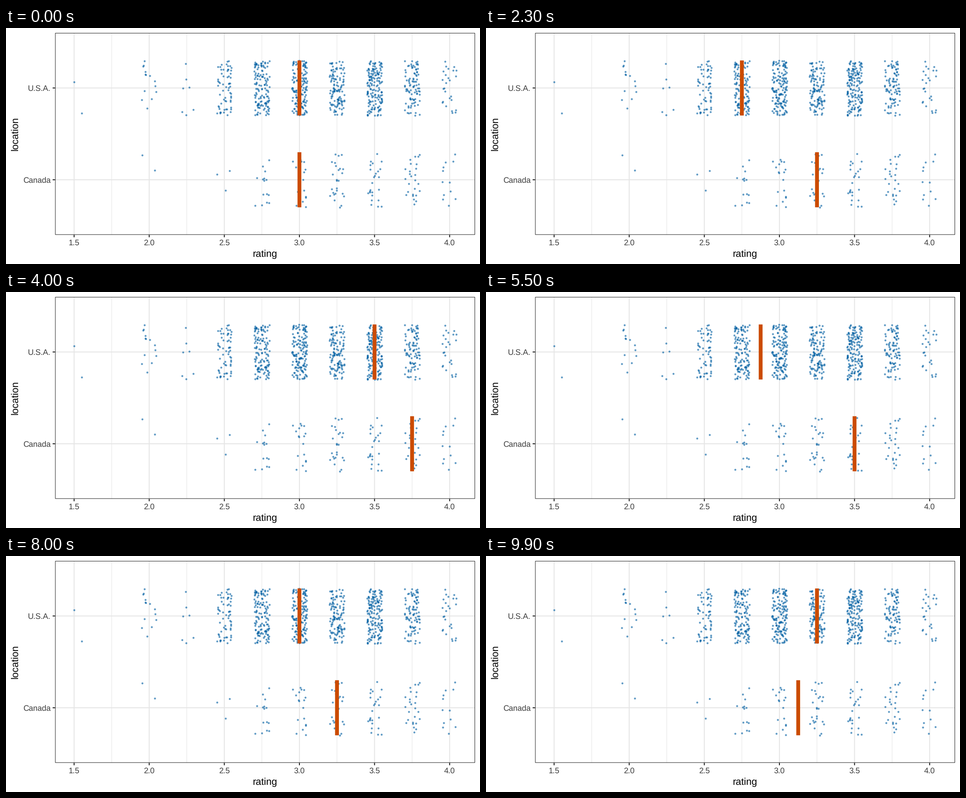
A matplotlib script that plays this animation: 1058x529 px, repeating every 10000 ms.

```python
import numpy as np
import matplotlib.pyplot as plt
from matplotlib.animation import FuncAnimation
from matplotlib.patches import Rectangle

plt.rcParams["font.family"] = "Liberation Sans"
plt.rcParams["text.hinting"] = "none"

W, H, DPI = 1058, 529, 100
PT = 72 / DPI  # points per pixel

LEFT, RIGHT, TOP, BOTTOM = 109.6, 1047, 11, 463.6
ROW = (BOTTOM - TOP) / 2.2
USA_Y, CANADA_Y = TOP + 0.6 * ROW, TOP + 1.6 * ROW
UNIT = 335.3
HALF_BAR = 0.3 * ROW
THIN, THICK = 1.07, 2.13

BLUE, ORANGE = "#005FA3", "#CB4B00"
GRID, DARK, LABEL = "#E6E6E6", "#262626", "#3C3C3C"

HOLD, STEP = 3, 4  # frames at rest, frames per draw

# Rating drawn for each location, one key pose per draw
USA_DRAWS = [3, 3, 3, 3.5, 2.75, 3, 2.5, 3.25, 3, 2.75, 3.5, 3.75, 2.75,
             3, 2.75, 3.5, 3.5, 3.5, 2.75, 3.25, 3, 3.5, 2.5, 3, 3.5]
CANADA_DRAWS = [3, 3.75, 3.25, 4, 3.25, 3.5, 3, 3.25, 3.75, 3.5, 3.75, 4, 3.75,
                3.25, 3.75, 2.75, 3, 3, 3.5, 4, 3.25, 4, 3.5, 3, 3.25]

# Number of points at each rating
USA_COUNTS = {2.0: 14, 2.25: 7, 2.5: 62, 2.75: 130, 3.0: 150,
              3.25: 120, 3.5: 161, 3.75: 92, 4.0: 26}
CANADA_COUNTS = {2.75: 15, 3.0: 18, 3.25: 26, 3.5: 25, 3.75: 26, 4.0: 12}
# Lone points, in pixels
LONERS = [(152, 121), (168.5, 191), (303.5, 285), (331.5, 319),
          (471, 327.5), (499, 320), (489.5, 364)]


def px(rating):
    return 152 + (rating - 1.5) * UNIT


def jitter(rng, counts, row_y):
    """Scatter points evenly around each rating on one row."""
    ratings = np.repeat(list(counts), list(counts.values()))
    x = px(ratings + rng.uniform(-0.05, 0.05, ratings.size))
    y = row_y + rng.uniform(-HALF_BAR, HALF_BAR, ratings.size)
    return np.column_stack([x, y])


fig = plt.figure(figsize=(W / DPI, H / DPI), dpi=DPI, facecolor="white")
ax = fig.add_axes([0, 0, 1, 1])
ax.set_xlim(0, W)
ax.set_ylim(H, 0)
ax.axis("off")


def line(xs, ys, color, width, z=1):
    return ax.plot(xs, ys, color=color, lw=width * PT, zorder=z,
                   solid_capstyle="butt", snap=False)[0]


def text(x, y, s, size, color, ha="center", **kw):
    ax.text(x, y, s, fontsize=size * PT, color=color, ha=ha, va="baseline",
            rotation_mode="anchor", **kw)


# Grid, ticks and labels
for rating in np.arange(1.75, 4, 0.5):
    line([px(rating)] * 2, [TOP, BOTTOM], GRID, THIN)
for name, y in (("U.S.A.", USA_Y), ("Canada", CANADA_Y)):
    line([LEFT, RIGHT], [y, y], GRID, THICK)
    line([LEFT - 5.5, LEFT], [y, y], DARK, THICK)
    text(99.6, y + 6.4, name, 17.6, LABEL, ha="right")
for rating in np.arange(1.5, 4.1, 0.5):
    x = px(rating)
    line([x, x], [TOP, BOTTOM], GRID, THICK)
    line([x, x], [BOTTOM, BOTTOM + 5.5], DARK, THICK)
    text(x, 486.8, f"{rating:.1f}", 17.6, LABEL)
text((LEFT + RIGHT) / 2, 513.5, "rating", 22, "black")
text(27, (TOP + BOTTOM) / 2, "location", 22, "black", rotation=90)

# Ratings
rng = np.random.default_rng(12)
points = np.vstack([LONERS, jitter(rng, USA_COUNTS, USA_Y),
                    jitter(rng, CANADA_COUNTS, CANADA_Y)])
ax.plot(*points.T, "o", color=BLUE, alpha=0.5, ms=3.1 * PT, mew=1.4 * PT,
        zorder=2, snap=False)

# Panel border
ax.add_patch(Rectangle((LEFT + THIN / 2, TOP + THIN / 2), RIGHT - LEFT - THIN,
                       BOTTOM - TOP - THIN, fill=False, ec=DARK,
                       lw=THIN * PT, zorder=4, snap=False))

bars = [line([0, 0], [y - HALF_BAR, y + HALF_BAR], ORANGE, 8.54, z=3)
        for y in (USA_Y, CANADA_Y)]


def update(frame):
    k, phase = divmod(frame, STEP)
    mix = max(0, phase - HOLD + 1) / (STEP - HOLD + 1)
    for bar, draws in zip(bars, (USA_DRAWS, CANADA_DRAWS)):
        start, end = draws[k], draws[(k + 1) % len(draws)]
        bar.set_xdata([px(start + (end - start) * mix)] * 2)
    return bars


anim = FuncAnimation(fig, update, frames=STEP * len(USA_DRAWS), interval=100,
                     repeat=True, repeat_delay=0)
plt.show()
```
